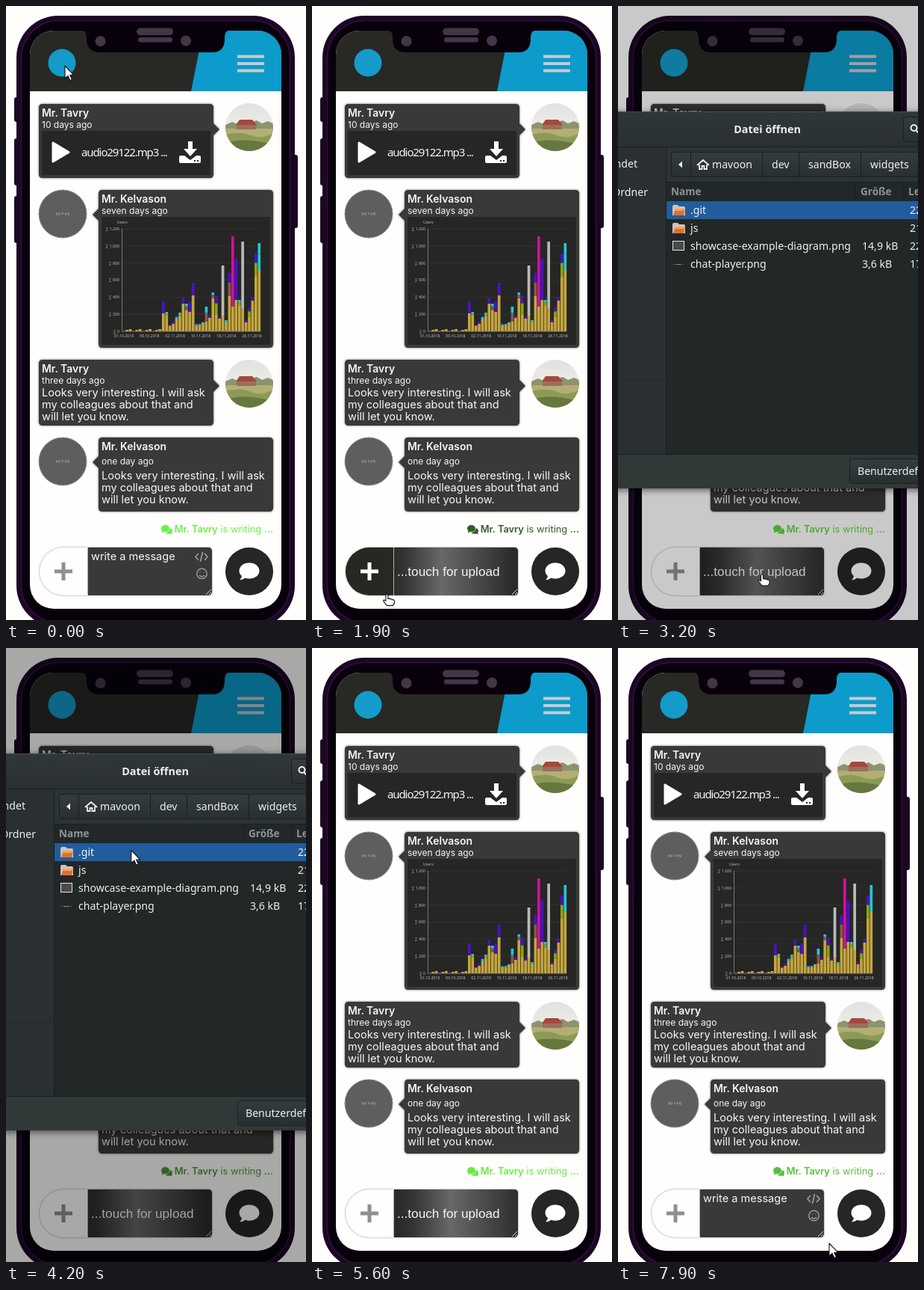
These frames come from a looping animation (402 px wide and 821 px high, 8 s). An HTML page:

```html
<!DOCTYPE html>
<html lang="en">
<head>
<meta charset="utf-8">
<title>Chat upload</title>
<style>
html, body { margin: 0; width: 100%; height: 100%; overflow: hidden; background: #fffefd; }
svg { display: block; }
text { font-family: Inter, sans-serif; font-size: 14.55px; fill: #f6f6f4; white-space: pre; }
.name { font-size: 13.9px; font-weight: 600; }
.ago { font-size: 12px; }
.file { font: 15px "Noto Sans", sans-serif; letter-spacing: -1.1px; }
.size { font: 5.5px "Noto Sans", sans-serif; fill: #b5b4b2; text-anchor: middle; }
.card { fill: #3a3937; filter: drop-shadow(0 0 1.5px #0009); }
.touch { font: 17.2px "Liberation Sans", sans-serif; }
#status text { font-size: 12.8px; fill: inherit; text-anchor: end; }
#status tspan { font-weight: 600; }
#chart text { font: 5.2px "Noto Sans", sans-serif; fill: #bdbcb8; }
#dialog text { font: 14.1px "Noto Sans", sans-serif; fill: #eef0ef; }
#dialog .title { font-size: 14.4px; font-weight: 700; text-anchor: middle; }
#dialog .col { font-size: 13.5px; font-weight: 700; fill: #8e9596; }
.btn { fill: url(#button); stroke: #1a1f20; }
.edge { stroke: #1a1f20; fill: none; }
.cursor { fill: #fff; stroke: #111; stroke-width: 1.1; stroke-linejoin: round; }
</style>
</head>
<body>
<svg width="402" height="821" viewBox="0 0 402 821">
  <defs>
    <clipPath id="screen"><rect x="32" y="33" width="337" height="773" rx="32"/></clipPath>
    <clipPath id="round"><circle r="32"/></clipPath>
    <linearGradient id="shine" gradientUnits="userSpaceOnUse" x1="110" x2="276">
      <stop offset="0" stop-color="#2a2a28"/><stop offset=".12" stop-color="#343432"/>
      <stop offset=".42" stop-color="#686866"/><stop offset="1" stop-color="#2a2a28"/>
    </linearGradient>
    <linearGradient id="button" x2="0" y2="1">
      <stop stop-color="#343c3d"/><stop offset="1" stop-color="#292f30"/>
    </linearGradient>
    <linearGradient id="bar" x2="0" y2="1">
      <stop stop-color="#303738"/><stop offset="1" stop-color="#2a3031"/>
    </linearGradient>
    <linearGradient id="sky" x2="0" y2="1">
      <stop stop-color="#dfe2e3"/><stop offset="1" stop-color="#f0ede4"/>
    </linearGradient>
    <g id="photo" clip-path="url(#round)">
      <rect x="-32" y="-32" width="64" height="34" fill="url(#sky)"/>
      <path d="M-32-3l9-4 7 3 8-6 10 3 8-2 7 4 8-3 7 3V6h-64z" fill="#8d9270"/>
      <rect x="-32" y="2" width="64" height="30" fill="#b3ae74"/>
      <path d="M-17 3v-7l4-5h17l5 5v7z" fill="#98705c"/>
      <path d="M-18-3l5-7h17l6 7z" fill="#a8473c"/>
      <path d="M-32 10q20-5 34 1t30-3v24h-64z" fill="#8c9a58"/>
      <path d="M-32 21q24-8 64 2v9h-64z" fill="#66773f"/>
    </g>
    <g id="blank">
      <circle r="32" fill="#5f5e5d" stroke="#8b8a89"/>
      <text class="size" transform="rotate(180)" y="2">64 x 64</text>
    </g>
    <g id="folder">
      <path d="M0 2q0-2 2-2h5l2 2h6q2 0 2 2v10H0z" fill="#c9c5c0"/>
      <path d="M1 14L4 5h13l-2 9z" fill="#e0702c"/>
      <path d="M4 5h13l-1 3H3z" fill="#f3a263"/>
    </g>
  </defs>

  <rect width="402" height="821" fill="#fffefd"/>
  <g fill="#1b0624">
    <rect x="11" y="122" width="8" height="33" rx="3"/>
    <rect x="11" y="177" width="8" height="63" rx="3"/>
    <rect x="11" y="254" width="8" height="63" rx="3"/>
    <rect x="383" y="199" width="8" height="98" rx="3"/>
    <rect x="14" y="13" width="373" height="818" rx="56"/>
  </g>
  <rect x="20.5" y="19.5" width="360" height="805" rx="50" fill="#08010c" stroke="#32113f" stroke-width="1.5"/>
  <g clip-path="url(#screen)">
    <rect x="32" y="33" width="337" height="773" fill="#fffefd"/>
    <rect x="32" y="33" width="337" height="81" fill="#282824"/>
    <path d="M264 33h105v81H248z" fill="#0c9bcb"/>
  </g>
  <path d="M100 32q8 1 8 9v3q0 18 18 18h150q17 0 17-18v-3q0-8 8-9z" fill="#08010c"/>
  <g fill="#43364a">
    <rect x="175" y="29.500" width="49" height="9.500" rx="4.700"/>
    <rect x="177" y="42" width="46" height="6.500" rx="3.200"/>
    <circle cx="126.500" cy="47" r="7"/><circle cx="241" cy="46.500" r="7"/>
  </g>
  <circle cx="75" cy="76" r="18.500" fill="#149bcb"/>
  <path d="M310 67.500h36m-36 9.500h36m-36 9.500h36" stroke="#c6cbcc" stroke-width="4"/>

  <path class="card" d="M49 131h224q5 0 5 5v21l8 8-8 8v52q0 5-5 5H49q-5 0-5-5v-89q0-5 5-5z"/>
  <rect x="48" y="167" width="226" height="59" fill="#262624"/>
  <text class="name" x="48" y="148">Mr. Tavry</text>
  <text class="ago" x="48" y="163">10 days ago</text>
  <path d="M63 183v25l21-12.500z" fill="#fff" stroke="#fff" stroke-width="3" stroke-linejoin="round"/>
  <text class="file" x="101" y="201">audio29122.mp3 ...</text>
  <path d="M244 181h6v10h6l-9 10-9-10h6zM234 200h5l8 6 8-6h4q2 0 2 2v6q0 2-2 2h-25q-2 0-2-2v-6q0-2 2-2z" fill="#fff"/>
  <path d="M252 207h2m2 0h2" stroke="#262624" stroke-width="2"/>
  <use href="#photo" x="326" y="162"/>

  <path class="card" d="M129 246h224q5 0 5 5v201q0 5-5 5H129q-5 0-5-5V287l-8-8 8-8v-20q0-5 5-5z"/>
  <rect x="128" y="282" width="226" height="171" fill="#262624"/>
  <text class="name" x="128" y="263">Mr. Kelvason</text>
  <text class="ago" x="128" y="278">seven days ago</text>
  <g id="chart"></g>
  <use href="#blank" x="76" y="278"/>

  <path class="card" d="M49 473h224q5 0 5 5v22l8 8-8 8v40q0 5-5 5H49q-5 0-5-5v-78q0-5 5-5z"/>
  <text class="name" x="48" y="490">Mr. Tavry</text>
  <text class="ago" x="48" y="505">three days ago</text>
  <g id="reply">
    <text x="48" y="522">Looks very interesting. I will ask</text>
    <text x="48" y="538">my colleagues about that and</text>
    <text x="48" y="554">will let you know.</text>
  </g>
  <use href="#photo" x="326" y="505"/>

  <path class="card" d="M129 577h224q5 0 5 5v89q0 5-5 5H129q-5 0-5-5v-53l-8-8 8-8v-20q0-5 5-5z"/>
  <text class="name" x="128" y="594">Mr. Kelvason</text>
  <text class="ago" x="128" y="613">one day ago</text>
  <use href="#reply" x="80" y="111"/>
  <use href="#blank" x="76" y="609"/>

  <g id="status">
    <path d="M208 698.500a5.500 4.500 0 1 1 4.500 4.500l-4 1.500 1-2.500q-1.500-1.500-1.500-3.500z"/>
    <path d="M220 698q3 1 3 4 0 1.500-1 2.500l1 2-3.500-1q-4 1-6.500-1.500 6-.5 7-6z"/>
    <text x="358" y="704"><tspan>Mr. Tavry</tspan> is writing <tspan>...</tspan></text>
  </g>

  <g filter="drop-shadow(0 0 1px #0007)">
    <path id="plusBox" d="M109 724H77a32 32 0 0 0 0 64h32z"/>
    <path id="field" d="M110 724h161q5 0 5 5v54q0 5-5 5H110z"/>
  </g>
  <path id="plus" d="M65 756h24m-12-12v24" stroke-width="5"/>
  <g id="write">
    <text x="114" y="741">write a message</text>
    <g fill="none" stroke="#9b9a98" stroke-width="1.700">
      <path d="M258 732l-4 4.500 4 4.500m8-9l4 4.500-4 4.500m-2.500-11l-3 13"/>
      <circle cx="262.500" cy="759" r="6.800" stroke-width="1.400"/>
      <path d="M259 761q3.500 4 7 0m-6-4.500v1m5-1v1" stroke-width="1.400"/>
    </g>
  </g>
  <text id="touch" class="touch" x="114" y="762">...touch for upload</text>
  <path d="M268 787l7-7m-3 7l3-3" stroke="#ddd" stroke-width="1"/>
  <circle cx="326" cy="756" r="32" fill="#262624"/>
  <path d="M326 744.500c7.500 0 13.500 4.700 13.500 10.700s-6 10.600-13.500 10.600q-3 0-5.500-1-3 2.500-7.500 2.700 2.500-2.500 3-5.200-3.500-3-3.500-7.100c0-6 6-10.700 13.500-10.700z" fill="#fff"/>

  <rect id="dim" width="402" height="821" fill="#000"/>
  <g id="dialog">
    <rect x="-20" y="141" width="450" height="504" fill="#222728" filter="drop-shadow(0 2px 5px #0009)"/>
    <rect x="-20" y="141" width="450" height="47" fill="url(#bar)"/>
    <path d="M0 141.500h402" stroke="#465052"/>
    <rect y="189" width="64" height="410" fill="#2a3031"/>
    <rect x="65" y="189" width="337" height="46" fill="#2c3334"/>
    <path d="M0 500.500h64" stroke="#232829"/>
    <rect y="599" width="402" height="46" fill="#303838"/>
    <path class="edge" d="M0 188.500h402M64.500 189v410M0 599.500h402M65 235.500h337M318.500 236v24M382.500 236v24"/>
    <text class="title" x="200" y="170">Datei öffnen</text>
    <rect class="btn" x="382.500" y="148.500" width="40" height="33" rx="3"/>
    <g fill="none" stroke="#eee" stroke-width="2"><circle cx="396.500" cy="163" r="4"/><path d="M399 166l5 5"/></g>
    <text x="26" y="216" text-anchor="end">Verwendet</text>
    <text x="40" y="254" text-anchor="end">Ordner</text>
    <rect class="btn" x="71.500" y="195.500" width="350" height="33" rx="3"/>
    <path class="edge" d="M97.500 196v32M193.500 196v32M242.500 196v32M325.500 196v32"/>
    <path d="M86 207.500v9l-5-4.500z" fill="#eee"/>
    <path d="M106 213l8-7 8 7m-13-1v6h3.500v-4h3v4h3.500v-6" fill="none" stroke="#eee" stroke-width="1.800"/>
    <text x="126" y="217">mavoon</text>
    <text x="206" y="217">dev</text>
    <text x="255" y="217">sandBox</text>
    <text x="338" y="217">widgets</text>
    <text class="col" x="71" y="253">Name</text>
    <text class="col" x="325" y="253">Größe</text>
    <text class="col" x="389" y="253">Letzte</text>
    <rect x="65" y="261" width="337" height="24" fill="#215d9c"/>
    <g id="files"></g>
    <use href="#folder" x="73" y="266"/>
    <use href="#folder" x="73" y="290"/>
    <rect x="73.500" y="314.500" width="15" height="12" fill="#4b4a48" stroke="#e4e4e2"/>
    <path d="M74 345.500h1m2 0h8m2 0h1" stroke="#8b8f90"/>
    <rect class="btn" x="310.500" y="605.500" width="110" height="33" rx="3"/>
    <text x="321" y="627">Benutzerdefiniert</text>
  </g>

  <path id="arrow" class="cursor" d="M0 0v17l4-3.600 2.800 6 2.700-1.200-2.700-5.800H12z"/>
  <path id="hand" class="cursor" d="M-1.500 1Q0-1 1.500 1v5l2-.5 1 1 2-.3 1 1.200q2-.5 2.500 1.300v3.300L8 15H0l-4.500-5.500q-.5-2 1-2l2 1.500z"/>
</svg>
<script>
const LOOP = 8000, STEP = 100;
const $ = id => document.getElementById(id);
const clamp = v => Math.min(1, Math.max(0, v));
const span = (t, a, b) => clamp((t - a) / (b - a));
const show = (id, on) => { $(id).style.display = on ? "" : "none"; };

function add(parent, tag, attrs, text) {
  const el = document.createElementNS("http://www.w3.org/2000/svg", tag);
  for (const k in attrs) el.setAttribute(k, attrs[k]);
  if (text) el.textContent = text;
  $(parent).append(el);
}

// Each bar: total height, yellow part, colour of the rest.
const BASE = "#c5a63d";
const COLORS = ["#4a10cf", "#d0109a", "#b9b9b7", "#20c8d6", "#8aa60c", "#875a48"];
const BARS = [
  [40, 24, 0], [26, 21, 4], [9, 7, 5], [13, 10, 0], [21, 16, 3], [25, 20, 4],
  [45, 37, 0], [37, 28, 5], [40, 26, 0], [65, 48, 0], [11, 7, 3], [10, 8, 4],
  [13, 11, 3], [33, 13, 5], [21, 18, 0], [52, 44, 5], [48, 22, 4], [20, 17, 0],
  [88, 21, 2], [15, 12, 3], [78, 47, 5], [127, 33, 1], [97, 42, 0], [42, 34, 4],
  [120, 31, 2], [15, 12, 0], [32, 19, 4], [46, 41, 0], [104, 73, 4], [118, 82, 3]
];

function drawChart() {
  const label = (x, y, s, anchor) => add("chart", "text", { x, y, "text-anchor": anchor }, s);
  label(149, 291, "Users", "start");
  ["1.200", "1.000", "800", "600", "400", "200", "0"].forEach((s, i) => {
    const y = 298 + i * 22.8;
    add("chart", "path", { d: `M153 ${y}H341`, stroke: "#3a3a37", "stroke-width": .6 });
    label(152, y + 2, "∑ " + s, "end");
  });
  ["01.10", "09.10", "02.11", "10.11", "18.11", "26.11"].forEach((s, i) =>
    label(158 + i * 34.3, 443, s + ".2018", "middle"));

  const bar = (i, from, to, fill) =>
    add("chart", "rect", { x: 155.8 + i * 4.43, y: 435 - to, width: 3.7, height: to - from, fill });
  for (let i = 0; i < 12; i++) bar(i, 0, 1 + i * 7 % 3, i % 3 ? BASE : COLORS[0]);
  BARS.forEach(([total, base, c], i) => {
    const mid = c > 2 ? base + (total - base) * .6 : total;
    bar(i + 12, 0, base, BASE);
    bar(i + 12, base, mid, COLORS[c]);
    if (mid < total) bar(i + 12, mid, total, COLORS[i % 2 ? 3 : 0]);
  });
  add("chart", "path", { d: "M155.500 298V435H341", fill: "none", stroke: "#8b8a86", "stroke-width": .8 });
}

function drawFiles() {
  [[".git", "", "22"], ["js", "", "21"],
   ["showcase-example-diagram.png", "14,9 kB", "22"],
   ["chat-player.png", "3,6 kB", "17"]].forEach((row, r) =>
    row.forEach((s, c) => add("files", "text", { x: [97, 327, 391][c], y: 278 + r * 24 }, s)));
}

// Pointer track: time, x, y.
const TRACK = [
  [0, 79, 80], [800, 90, 757], [1700, 90, 757], [2000, 104, 797], [2300, 137, 798],
  [2600, 193, 760], [3400, 193, 760], [3700, 150, 560], [4000, 76, 330], [4300, 200, 250],
  [4600, 347, 163], [4800, 425, 150], [6100, 425, 690], [6600, 335, 765], [7400, 330, 765],
  [7700, 290, 800], [7900, 283, 796], [8000, 283, 796]
];

function pointer(t) {
  const i = TRACK.findIndex((p, n) => t >= p[0] && t < TRACK[n + 1][0]);
  const [a, x, y] = TRACK[i], [b, x2, y2] = TRACK[i + 1];
  const k = span(t, a, b), e = k * k * (3 - 2 * k);
  return [x + (x2 - x) * e, y + (y2 - y) * e];
}

function pulse(t) {
  const k = (.5 + .5 * Math.cos((t - 30) / 1100 * 2 * Math.PI)) ** 1.2;
  return `rgb(${[105, 245, 70].map(c => Math.round(30 + (c - 30) * k))})`;
}

function render(t) {
  $("status").style.fill = pulse(t);

  const dark = t >= 800 && t < 3000, touch = t >= 1600 && t < 7400;
  $("plusBox").style.fill = dark ? "#272724" : "#fffefd";
  $("plus").style.stroke = dark ? "#fff" : "#8f8f8d";
  $("field").style.fill = touch ? "url(#shine)" : "#3a3937";
  $("shine").setAttribute("gradientTransform", `translate(${6 * Math.sin(t / 400)})`);
  show("touch", touch);
  show("write", !touch);

  const opened = 1 - (1 - span(t, 2850, 3150)) ** 2;
  const scale = opened - span(t, 5250, 5500) ** 2.4;
  $("dim").style.opacity = .34 * (span(t, 2880, 3400) - span(t, 5270, 5570));
  show("dialog", scale > 0);
  $("dialog").setAttribute("transform", `translate(0 ${393 * (1 - scale)}) scale(1 ${scale})`);

  const [x, y] = pointer(t);
  const over = y > 724 && y < 788 && (x < 276 || Math.hypot(x - 326, y - 756) < 32);
  for (const id of ["arrow", "hand"]) {
    show(id, (id === "hand") === over);
    $(id).setAttribute("transform", `translate(${x} ${y})`);
  }
}

drawChart();
drawFiles();
const start = performance.now();
function tick() {
  const t = (performance.now() - start) % LOOP;
  render(Math.floor(t / STEP) * STEP);
  requestAnimationFrame(tick);
}
tick();
</script>
</body>
</html>
```
